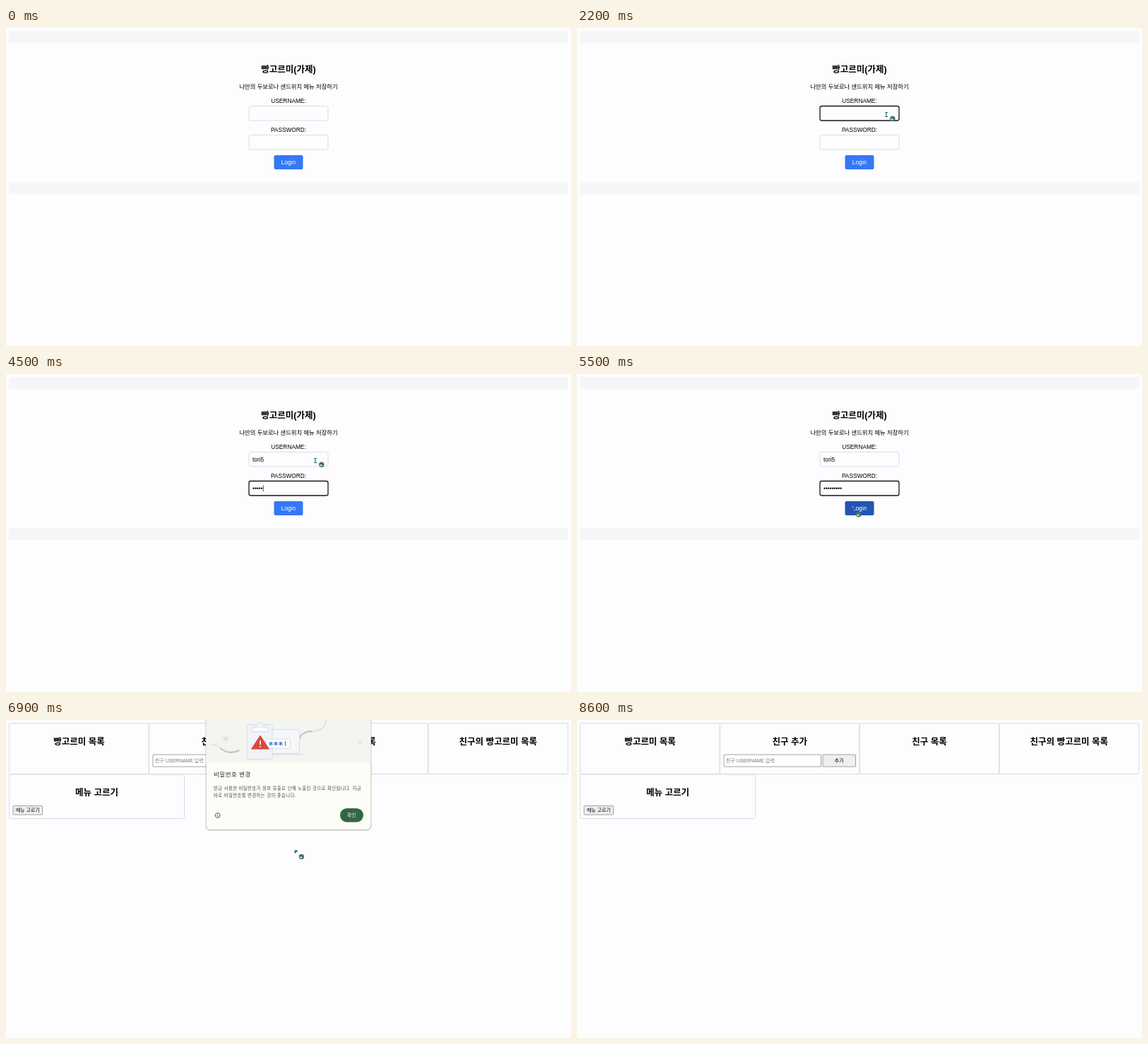
Animation, 800 px wide and 450 px high, one loop 10 s. Source, as an HTML page:

```html
<!DOCTYPE html>
<html lang="ko">
<head>
<meta charset="utf-8">
<style>
  html, body { margin: 0; width: 100%; height: 100%; overflow: hidden; background: #fdfcfe; }
  svg { display: block; width: 800px; height: 450px; font: 8.32px "Liberation Sans", "Noto Sans CJK KR", sans-serif; }
  text { white-space: pre; }
  .mid { text-anchor: middle; }
  .title { font-size: 12.5px; font-weight: 700; text-anchor: middle; }
  .small { font-size: 6.93px; }
  .card { fill: none; stroke: #dadade; }
  .field { fill: #fdfcfe; stroke: #dddde2; }
  .field.focus { stroke: #17171c; stroke-width: 1.3; }
  .control { stroke: #8b8b8e; stroke-width: .8; }
  .art { fill: none; stroke: #d9dce0; stroke-linecap: round; }
</style>
</head>
<body>
<svg viewBox="0 0 800 450">
  <g id="login">
    <path d="M4 4H796V21H4zM4 218H796V235H4z" fill="#f6f6f8"/>
    <text class="title" x="400" y="62.5">빵고르미(가제)</text>
    <text class="mid" x="400" y="86">나만의 두보로나 샌드위치 메뉴 저장하기</text>
    <text class="mid" x="400" y="106">USERNAME:</text>
    <rect id="userBox" class="field" x="344" y="110.5" width="112" height="20.5" rx="2.5"/>
    <text id="user" x="349" y="124"></text>
    <text class="mid" x="400" y="146.7">PASSWORD:</text>
    <rect id="passBox" class="field" x="344" y="151.5" width="112" height="20.5" rx="2.5"/>
    <text id="pass" x="349" y="165"></text>
    <rect id="caret" width=".7" height="9" fill="#222"/>
    <rect id="submit" x="379.5" y="180" width="41" height="20" rx="2.2"/>
    <text class="mid" x="400" y="192.7" fill="#fff">Login</text>
  </g>

  <g id="home">
    <g id="cards"></g>
    <rect class="control" x="208" y="49" width="137.5" height="17" rx=".8" fill="#fff"/>
    <text class="small" x="211" y="60" fill="#757575">친구 USERNAME 입력</text>
    <rect class="control" x="348" y="49" width="46.5" height="17" rx=".8" fill="#efeff0"/>
    <text class="small mid" x="371.2" y="60.2">추가</text>
    <rect class="control" x="10" y="121.5" width="41.5" height="12.5" rx=".8" fill="#efeff0"/>
    <text class="small mid" x="30.8" y="130.3">메뉴 고르기</text>
  </g>

  <g id="dialog">
    <rect x="282.2" y="-10" width="235.6" height="167" rx="7" fill="#000" opacity=".09"/>
    <rect x="282.7" y="-10" width="234.6" height="166" rx="6.5" fill="#000" opacity=".16"/>
    <rect x="283.5" y="-10" width="233" height="165" rx="6" fill="#fcfdf6"/>
    <path d="M283.5 0H516.5V60H283.5z" fill="#f3f5f0"/>
    <g class="art">
      <path d="M290 34Q298 35 304 40" stroke="#e3e5e4" stroke-width="2"/>
      <path d="M304 40Q315 50 330 43" stroke="#bfc2c3" stroke-width="2"/>
      <path d="M415 29Q417 16 434 16" stroke="#bfc2c3" stroke-width="2.2"/>
      <path d="M434 16Q452 15 453 0" stroke="#dfe2e2" stroke-width="2"/>
      <path d="M311 22V31M307 24.3L315 28.7M307 28.7L315 24.3" stroke-width="1.3"/>
      <path d="M497 33Q501 27 505 33z" fill="#e0e3e2" stroke="none"/>
      <rect x="376" y="13.5" width="39.5" height="34" rx="2" fill="#f4f6fa"/>
      <path d="M355 49H422"/>
      <rect x="341.5" y="6.5" width="35.5" height="49" rx="2.5" fill="#f1f3f9"/>
      <rect x="348" y="10" width="23" height="6.5" rx="2" fill="#fafbfc"/>
      <path d="M354 10V6Q359.5 1 365 6V10" fill="#f1f3f9"/>
      <rect x="368" y="27" width="34" height="13" rx="1" fill="#fff"/>
    </g>
    <path id="stars" fill="none" stroke="#3b6fd4" stroke-width="1.1"/>
    <path d="M360 22L372.5 41H347.5z" fill="#d84a3a" stroke="#d84a3a" stroke-linejoin="round"/>
    <path d="M360 29V35M360 36.7V38.4" stroke="#fff" stroke-width="1.6"/>
    <text x="294" y="80" fill="#2d302d" font-size="8.5" letter-spacing=".5">비밀번호 변경</text>
    <g fill="#4a4d49" font-size="6.4" letter-spacing=".37">
      <text x="294" y="99.3">방금 사용한 비밀번호가 정보 유출로 인해 노출된 것으로 확인됩니다. 지금</text>
      <text x="294" y="109.3">바로 비밀번호를 변경하는 것이 좋습니다.</text>
    </g>
    <g fill="none" stroke="#444844" stroke-width=".9">
      <circle cx="299.7" cy="135" r="3.4"/>
      <path d="M299.7 134.5V137M299.7 132.8V133.7"/>
    </g>
    <rect x="473" y="125" width="33" height="19.5" rx="9.75" fill="#346544"/>
    <text class="mid" x="489.6" y="137.4" fill="#fff" font-size="6.6" letter-spacing=".3">확인</text>
  </g>

  <g id="pointer">
    <path id="tip"/>
    <circle cx="9.8" cy="9.2" r="3.7" fill="#4c7069"/>
    <ellipse cx="9" cy="10.3" rx="1.8" ry="1.3" fill="#c3d0c8"/>
  </g>
</svg>
<script>
const $ = id => document.getElementById(id);
const show = (id, on) => { $(id).style.display = on ? '' : 'none'; };
const clamp = v => Math.max(0, Math.min(1, v));

const LOOP = 10000, STEP = 100;
const FOCUS_USER = 1700, FOCUS_PASS = 3200, BLUR = 6000, OPEN_HOME = 6300;
const NAME = 'tori5';
const nameKeys = [2400, 2500, 2700, 2800, 3000];
const passKeys = [3900, 4000, 4100, 4400, 4500, 4600, 4800, 4900, 5000];
const moves = [
  [1200, 732, 138], [1700, 437, 119], [5200, 437, 119], [5500, 389, 189.5],
  [6800, 389, 189.5], [7300, 577, 138.5], [7700, 577, 138.5],
  [8000, 490, 134], [8200, 490, 134], [8500, 18, 124]
];
const BEAM = 'M-1 0H3V1H1.6V6H3V7H-1V6H.4V1H-1z', CORNER = 'M0 0H4.2V1.3L1.3 4.2H0z';

const card = (title, x, y, w, h) =>
  `<rect class="card" x="${x}" y="${y}" width="${w}" height="${h}" rx="2"/>
   <text class="title" x="${x + w / 2}" y="${y + 30}">${title}</text>`;
$('cards').innerHTML =
  ['빵고르미 목록', '친구 추가', '친구 목록', '친구의 빵고르미 목록']
    .map((title, i) => card(title, 4.5 + i * 197.8, 4.5, 197.8, 72)).join('') +
  card('메뉴 고르기', 4.5, 77, 248, 62.5);
$('stars').setAttribute('d', [375, 382, 389]
  .map(x => `M${x} 30.5v6M${x - 2.6} 32l5.2 3m0-3l-5.2 3`).join('') + 'M395.5 30v7');

function pointerAt(t) {
  const i = moves.findIndex(m => m[0] > t);
  if (i < 0) return moves[moves.length - 1].slice(1);
  if (i === 0) return moves[0].slice(1);
  const [t0, x0, y0] = moves[i - 1], [t1, x1, y1] = moves[i];
  const u = (t - t0) / (t1 - t0), k = u * u * (3 - 2 * u);
  return [x0 + (x1 - x0) * k, y0 + (y1 - y0) * k];
}

function drawLogin(t, hover) {
  const inUser = t >= FOCUS_USER && t < FOCUS_PASS;
  const inPass = t >= FOCUS_PASS && t < BLUR;
  const typed = keys => keys.filter(k => k <= t).length;
  const nameCount = typed(nameKeys), passCount = typed(passKeys);
  $('user').textContent = NAME.slice(0, nameCount);
  $('pass').textContent = '•'.repeat(passCount);
  $('userBox').classList.toggle('focus', inUser);
  $('passBox').classList.toggle('focus', inPass);
  $('submit').setAttribute('fill', hover ? '#2056b2' : '#3478f6');

  const lastAction = inUser ? nameKeys[nameCount - 1] || FOCUS_USER : passKeys[passCount - 1] || FOCUS_PASS;
  show('caret', (inUser || inPass) && (t - lastAction) % 1000 < 500);
  const field = inUser ? $('user') : $('pass');
  $('caret').setAttribute('x', 349.4 + field.getComputedTextLength());
  $('caret').setAttribute('y', inUser ? 116.5 : 157.3);
}

function draw(t) {
  const onLogin = t < OPEN_HOME;
  const [x, y] = pointerAt(t);
  const hover = onLogin && x > 379 && x < 421 && y > 180 && y < 200;
  const beam = onLogin && x > 344 && x < 456 && y > 110 && y < 131;

  show('login', onLogin);
  show('home', !onLogin);
  if (onLogin) drawLogin(t, hover);

  const opacity = clamp((t - 6600) / 200) * clamp((8300 - t) / 200);
  show('dialog', opacity > 0);
  $('dialog').setAttribute('opacity', opacity);

  show('pointer', t >= 1200 && t < 8600);
  $('pointer').setAttribute('transform', `translate(${x} ${y})`);
  $('tip').setAttribute('d', beam ? BEAM : CORNER);
  $('tip').setAttribute('fill', hover ? '#1d4f9f' : '#20786c');
}

function tick() {
  draw(Math.floor(performance.now() % LOOP / STEP) * STEP);
  requestAnimationFrame(tick);
}
tick();
</script>
</body>
</html>
```
